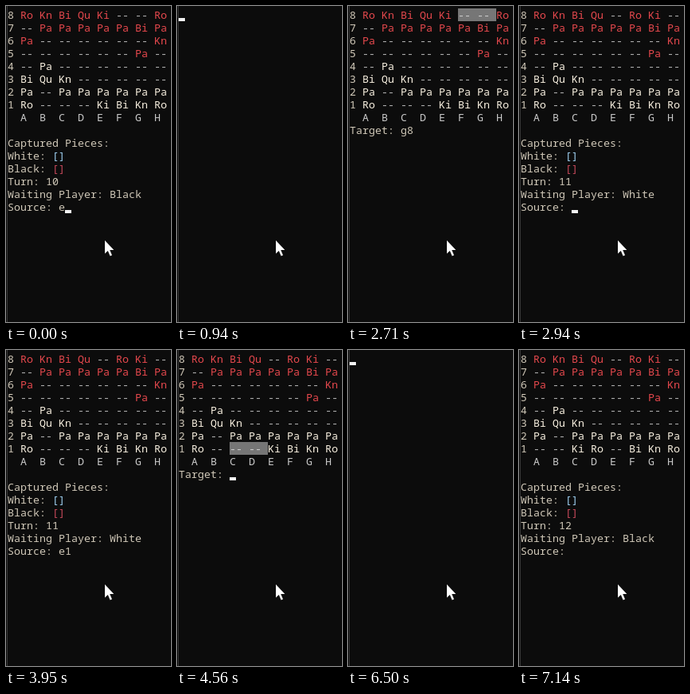
An HTML page with a canvas for the animation above (7370 ms loop, 207x395 px).

```html
<!DOCTYPE html>
<html lang="en">
<head>
<meta charset="utf-8">
<title>Terminal chess</title>
<style>
html, body { margin: 0; width: 100%; height: 100%; overflow: hidden; background: #0c0c0c; }
canvas { display: block; }
</style>
</head>
<body>
<canvas width="207" height="395"></canvas>
<script>
const LOOP = 7370, CELL_W = 8, CELL_H = 16, LEFT = 2, TOP = 3;
const TEXT = '#d0c8b8', DASH = '#b8b8b8', RED = '#e5484d', WHITE = '#f8f0e0';
const ctx = document.querySelector('canvas').getContext('2d');

const middle = [
  '-- Pa Pa Pa Pa Pa Bi Pa',
  'Pa -- -- -- -- -- -- Kn',
  '-- -- -- -- -- -- Pa --',
  '-- Pa -- -- -- -- -- --',
  'Bi Qu Kn -- -- -- -- --',
  'Pa -- Pa Pa Pa Pa Pa Pa'
];
const board = (black, white) => [black, ...middle, white];
const start = board('Ro Kn Bi Qu Ki -- -- Ro', 'Ro -- -- -- Ki Bi Kn Ro');
const blackCastled = board('Ro Kn Bi Qu -- Ro Ki --', 'Ro -- -- -- Ki Bi Kn Ro');
const bothCastled = board('Ro Kn Bi Qu -- Ro Ki --', '-- -- Ki Ro -- Bi Kn Ro');

const source = (pieces, turn, player) => (typed, cursor) => () => {
  drawBoard(pieces);
  write(0, 10, 'Captured Pieces:');
  write(0, 11, 'White: ');
  write(7, 11, '[]', '#a0d2f4');
  write(0, 12, 'Black: ');
  write(7, 12, '[]', '#c84a5c');
  write(0, 13, 'Turn: ' + turn);
  write(0, 14, 'Waiting Player: ' + player);
  prompt(15, 'Source: ', typed, cursor);
};
const target = (pieces, row, file) => (typed, cursor) => () => {
  drawBoard(pieces, row, file);
  prompt(9, 'Target: ', typed, cursor);
};
const blank = (row = 0) => () => drawCursor(0, row);

const source10 = source(start, 10, 'Black');
const source11 = source(blackCastled, 11, 'White');
const source12 = source(bothCastled, 12, 'Black');
const target10 = target(start, 0, 5);
const target11 = target(blackCastled, 7, 2);

// [start time in ms, screen]
const timeline = [
  [0, source10('e', true)],
  [390, source10('e', false)],
  [560, source10('e8', true)],
  [940, blank()],
  [1015, () => drawBoard(start, 0, 5, 4)],
  [1090, target10('', true)],
  [2030, target10('', false)],
  [2105, target10('g', false)],
  [2180, target10('g', true)],
  [2480, target10('g8', true)],
  [2710, target10('g8', false)],
  [2870, blank()],
  [2940, source11('', true)],
  [3720, source11('e', true)],
  [3950, source11('e1', false)],
  [4480, blank(16)],
  [4560, target11('', true)],
  [5490, target11('', false)],
  [5650, target11('c', true)],
  [5810, target11('c1', true)],
  [6040, target11('c1', false)],
  [6500, blank()],
  [6580, source12('', true)],
  [7140, source12('', false)]
];

function write(col, row, text, color = TEXT) {
  ctx.fillStyle = color;
  [...text].forEach((ch, i) =>
    ctx.fillText(ch, LEFT + (col + i) * CELL_W, TOP + row * CELL_H + 13));
}

function drawCursor(col, row) {
  ctx.fillStyle = '#f2f2f2';
  ctx.fillRect(LEFT + col * CELL_W, TOP + row * CELL_H + 12, CELL_W, 4);
}

function prompt(row, label, typed, cursor) {
  write(0, row, label + typed);
  if (cursor) drawCursor(label.length + typed.length, row);
}

// Two squares starting at markFile are highlighted as legal moves.
function drawBoard(pieces, markRow, markFile, rows = 8) {
  pieces.slice(0, rows).forEach((line, row) => {
    if (row === markRow) {
      ctx.fillStyle = '#767676';
      ctx.fillRect(LEFT + (2 + markFile * 3) * CELL_W, TOP + row * CELL_H, 6 * CELL_W, CELL_H);
    }
    write(0, row, String(8 - row));
    line.split(' ').forEach((piece, file) => {
      const marked = row === markRow && (file === markFile || file === markFile + 1);
      const color = piece !== '--' ? (row < 4 ? RED : WHITE) : marked ? '#d0d0d0' : DASH;
      write(2 + file * 3, row, piece, color);
    });
  });
  if (rows === 8) write(2, 8, [...'ABCDEFGH'].join('  '), '#c8c8c8');
}

const arrow = new Path2D('M124 293V309.5L127.8 306L130.6 312.5L133 311.5L130.2 305H135.3Z');

function frame(now) {
  const t = now % LOOP;
  ctx.fillStyle = '#0c0c0c';
  ctx.fillRect(0, 0, 207, 395);
  ctx.fillStyle = '#3a3a3a';
  ctx.fillRect(1, 0, 1, 395);
  ctx.font = '13.33px "Noto Sans Mono", "DejaVu Sans Mono", monospace';
  timeline.findLast(([at]) => at <= t)[1]();
  ctx.fillStyle = '#fff';
  ctx.fill(arrow);
  requestAnimationFrame(frame);
}
requestAnimationFrame(frame);
</script>
</body>
</html>
```
